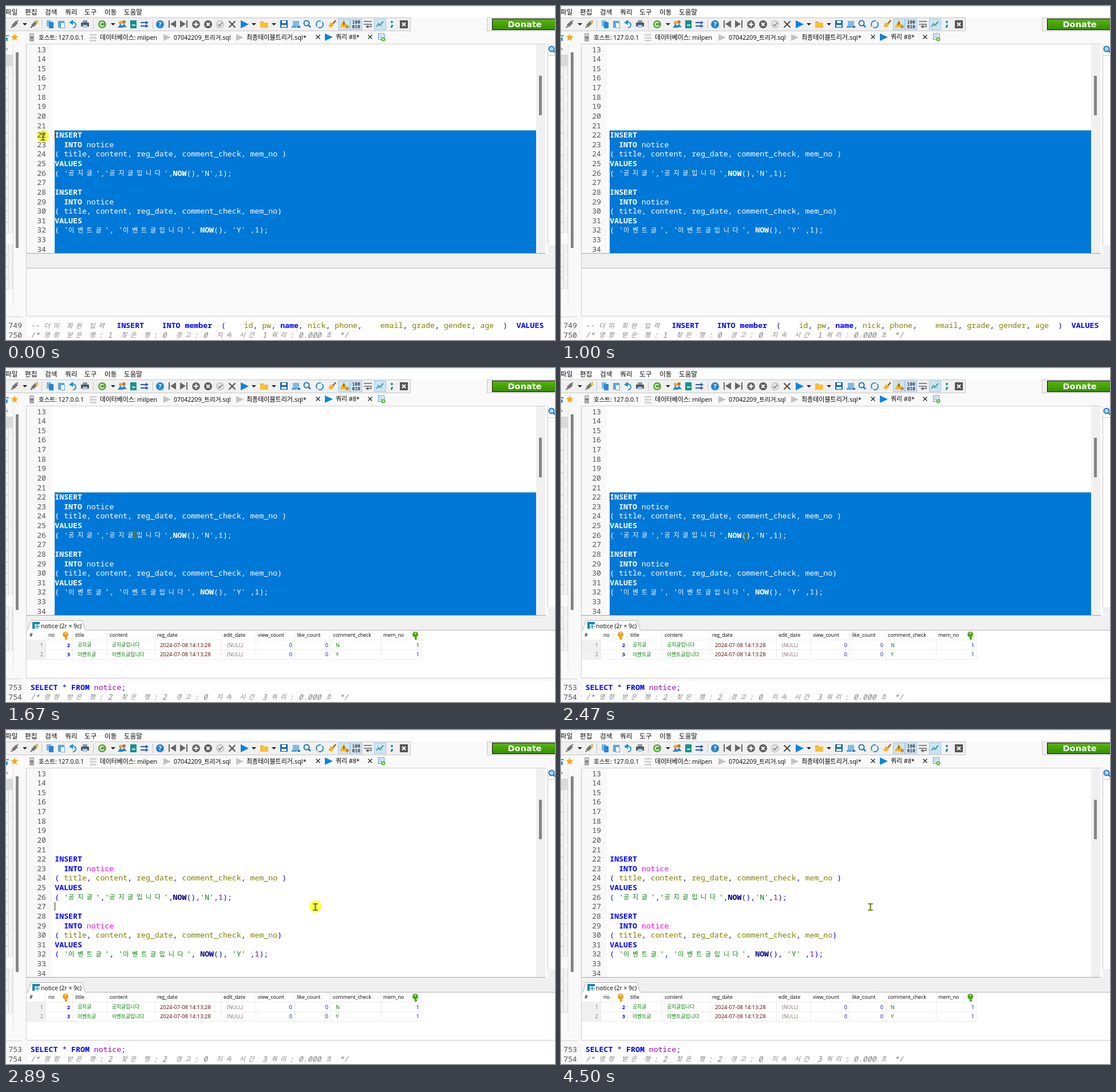
These frames come from a looping animation (959x584 px, 4760 ms). An HTML page with a canvas:

```html
<!DOCTYPE html>
<html lang="ko">
<head>
<meta charset="utf-8">
<style>
html, body { margin: 0; width: 100%; height: 100%; overflow: hidden; background: #f9f9f9; }
canvas { display: block; }
</style>
</head>
<body>
<canvas id="stage" width="959" height="584"></canvas>
<script>
const c = document.getElementById('stage').getContext('2d');
const UI = '"Open Sans", "Noto Sans CJK KR", "Noto Sans CJK", sans-serif';
const MONO = '"Noto Sans Mono", "DejaVu Sans Mono", monospace';
const HANGUL = '"Noto Sans CJK KR", "Noto Sans CJK", sans-serif';
const CELL = 7.935, LINE = 16.62, LOOP = 4760;

const sql = {
  22: 'INSERT',
  23: '  INTO notice',
  24: '( title, content, reg_date, comment_check, mem_no )',
  25: 'VALUES',
  26: "( '공지글','공지글입니다',NOW(),'N',1);",
  28: 'INSERT',
  29: '  INTO notice',
  30: '( title, content, reg_date, comment_check, mem_no)',
  31: 'VALUES',
  32: "( '이벤트글', '이벤트글입니다', NOW(), 'Y' ,1);"
};
const logs = [
  [749, '-- 더미 회원 입력  INSERT    INTO member  (    id, pw, name, nick, phone,    email, grade, gender, age  )  VALUES',
   '/* 영향 받은 행: 1  찾은 행: 0  경고: 0  지속 시간 1 쿼리: 0.000 초 */'],
  [753, 'SELECT * FROM notice;',
   '/* 영향 받은 행: 2  찾은 행: 2  경고: 0  지속 시간 3 쿼리: 0.000 초 */']
];

function box(x, y, w, h, fill) { c.fillStyle = fill; c.fillRect(x, y, w, h); }
function frame(x, y, w, h, color) { c.strokeStyle = color; c.lineWidth = 1; c.strokeRect(x + .5, y + .5, w - 1, h - 1); }
function disc(x, y, r, fill) { c.fillStyle = fill; c.beginPath(); c.arc(x, y, r, 0, 7); c.fill(); }
function poly(pts, fill) {
  c.fillStyle = fill;
  c.beginPath();
  for (let i = 0; i < pts.length; i += 2) c.lineTo(pts[i], pts[i + 1]);
  c.fill();
}
function path(pts, color, w = 1.5) {
  c.strokeStyle = color; c.lineWidth = w;
  c.beginPath();
  for (let i = 0; i < pts.length; i += 2) c.lineTo(pts[i], pts[i + 1]);
  c.stroke();
}
function arc(x, y, r, a, b, color, w = 2) {
  c.strokeStyle = color; c.lineWidth = w;
  c.beginPath(); c.arc(x, y, r, a, b); c.stroke();
}
function cross(x, y, r, color, w) {
  path([x - r, y - r, x + r, y + r], color, w);
  path([x - r, y + r, x + r, y - r], color, w);
}
// y is the middle of the line
function text(s, x, y, size, color = '#000', align = 'left', weight = 500) {
  c.font = `${weight} ${size}px ${UI}`;
  c.textAlign = align; c.fillStyle = color;
  c.fillText(s, x, y + size * .37);
  c.textAlign = 'left';
}

function style(tok, inLog) {
  if (/^(--|\/\*)/.test(tok)) return ['#808080', 'italic'];
  if (tok[0] === "'") return ['#008000', '500'];
  if (tok === 'NOW') return ['#000080', 'bold'];
  if (/^([A-Z]+|member|name)$/.test(tok)) return ['#0000ff', 'bold'];
  if (tok === 'notice') return [inLog ? '#a000c8' : '#ff00ff', '500'];
  if (/^\d/.test(tok)) return ['#800080', '500'];
  return [/^\w/.test(tok) ? '#808000' : '#0000ff', '500'];
}
function code(line, x, y, { selected, inLog } = {}) {
  for (const tok of line.match(/-- .*력|\/\*.*|'[^']*'|\w+|./g)) {
    const [color, face] = style(tok, inLog);
    c.fillStyle = selected ? '#fff' : color;
    for (const ch of tok) {
      const wide = ch > '\u1100';
      c.font = wide ? `${face} 11px ${HANGUL}` : `${face} 13.23px ${MONO}`;
      c.fillText(ch, x, y + (wide ? 4 : 4.6));
      x += wide ? CELL * 2 : CELL;
    }
  }
}
function lineNo(n, right, y) {
  c.font = `13.23px ${MONO}`;
  c.textAlign = 'right'; c.fillStyle = '#555';
  c.fillText(n, right, y + 4.6);
  c.textAlign = 'left';
}

function plug(x) {
  path([x - 6, 38, x - 2, 34], '#666', 2);
  poly([x - 5, 33, x + 2, 26, x + 6, 30, x - 1, 37], '#777');
  path([x + 3, 28, x + 6, 25], '#777', 2);
}
function lens(x, y, color) { arc(x - 1, y - 1, 4.5, 0, 7, color, 2); path([x + 2, y + 2, x + 6, y + 6], color, 2.5); }
function floppy(x, color) { box(x - 6, 25, 13, 13, color); box(x - 3, 26, 7, 4, '#fff'); box(x - 4, 33, 9, 4, '#dbe9f5'); }

function toolbar() {
  box(0, 21, 707, 23, '#f0f0f0');
  path([0, 20.5, 706.5, 20.5, 706.5, 43.5, 0, 43.5], '#c8c8c8', 1);
  for (const x of [62, 152, 256]) box(x, 24, 1, 16, '#c4c4c4');
  for (const x of [580, 601, 643]) { box(x, 22, 21, 20, '#cce4f7'); frame(x, 22, 21, 20, '#9ccbee'); }
  for (const x of [33, 187, 433, 468]) poly([x - 4, 30, x + 4, 30, x, 34], '#222');

  plug(15); plug(49); disc(54, 28, 2.5, '#f2c230');
  box(71, 25, 8, 11, '#77b7e8'); box(75, 28, 8, 11, '#2487d2');
  box(91, 26, 11, 12, '#5aa7df'); box(95, 29, 8, 10, '#fff'); frame(95, 29, 8, 10, '#5aa7df');
  arc(117, 33, 5, -1.8, 1.6, '#1594d2'); poly([110, 29, 117, 24, 117, 33], '#1594d2');
  box(131, 29, 14, 7, '#4c5963'); box(134, 25, 8, 4, '#8796a3'); box(134, 33, 8, 5, '#a9d0ed');
  disc(168, 32, 7, '#57a83b'); arc(168, 32, 3.5, .5, 5.5, '#fff', 1.6);
  disc(200, 29, 3, '#e9a33b'); poly([195, 38, 200, 31, 205, 38], '#2487d2');
  disc(206, 28, 3, '#b97a35'); poly([201, 37, 206, 31, 211, 37], '#357fb6');
  box(217, 25, 11, 14, '#16908b'); box(220, 32, 6, 3, '#9adbd5');
  path([235, 29, 245, 29], '#2458c8', 2); poly([244, 26, 249, 29, 244, 32], '#2458c8');
  path([235, 35, 245, 35], '#2458c8', 2); poly([244, 32, 249, 35, 244, 38], '#2458c8');
  disc(269, 32, 7, '#1c84d6'); text('?', 269, 32, 11, '#fff', 'center', 'bold');
  box(284, 25, 2, 13, '#666'); poly([297, 25, 297, 38, 287, 31.5], '#666');
  box(315, 25, 2, 13, '#666'); poly([304, 25, 304, 38, 314, 31.5], '#666');
  disc(332, 32, 7, '#6b6b6b'); path([328, 32, 336, 32], '#fff', 2); path([332, 28, 332, 36], '#fff', 2);
  disc(353, 32, 7, '#5d5d5d'); cross(353, 32, 2.8, '#fff', 2);
  disc(374, 32, 7, '#bcbcbc'); disc(374, 32, 5.8, '#e4e4e4'); path([371, 32, 373, 35, 378, 29], '#777');
  cross(395, 32, 5.5, '#555', 2.3);
  poly([410, 25, 424, 32, 410, 39], '#0a84e0');
  box(444, 27, 6, 4, '#f0b323'); box(444, 29, 14, 9, '#f8c032');
  floppy(485, '#1769ab');
  box(501, 26, 11, 9, '#7fbbe6'); box(499, 35, 9, 3, '#4aa3df'); box(509, 35, 5, 3, '#2b6ca3');
  lens(526, 31, '#1f78c0');
  arc(548, 32, 6, -.8, 2, '#2b8dd8'); arc(548, 32, 6, 2.4, 5.1, '#2b8dd8');
  path([571, 31, 576, 25], '#9b6024', 2.5); poly([568, 28, 573, 33, 568, 38, 563, 35], '#f0b429');
  poly([590, 24, 597, 37, 583, 37], '#f4b41c'); box(589.5, 28, 1.5, 5, '#333'); disc(596, 36, 3, '#e08a20');
  c.font = `bold 8px ${MONO}`; c.fillStyle = '#444';
  c.fillText('100', 604.5, 31); c.fillText('010', 604.5, 39);
  path([625, 27, 639, 27], '#666'); path([625, 32, 638, 32, 638, 36, 631, 36], '#666'); poly([633, 33, 633, 39, 628, 36], '#666');
  path([647, 36, 651, 31, 653, 34, 659, 27], '#3f9b90', 2); path([649, 29, 658, 36], '#78b8b0', 1);
  disc(674, 28, 2, '#168a9b'); path([675, 33, 673, 38], '#168a9b', 3);
  box(688, 25, 14, 14, '#555'); cross(695, 32, 3, '#fff', 2);

  box(840, 21, 119, 23, '#f0f0f0'); frame(840, 20, 125, 24, '#c8c8c8');
  box(849, 22, 110, 20, '#111');
  const green = c.createLinearGradient(0, 23, 0, 41);
  green.addColorStop(0, '#55b50c'); green.addColorStop(1, '#379000');
  box(850, 23, 109, 18, green);
  c.font = 'bold 14.6px "DejaVu Sans", sans-serif';
  c.fillStyle = '#fff'; c.fillText('Donate', 876.5, 37);
}

function tabs() {
  box(0, 51, 5, 2, '#2b9be0'); box(0, 55, 3, 6, '#2b9be0');
  const star = [];
  for (let i = 0; i < 10; i++) {
    const r = i % 2 ? 3 : 7, a = i * Math.PI / 5;
    star.push(15 + r * Math.sin(a), 55 - r * Math.cos(a));
  }
  poly(star, '#f7a81b');
  box(41, 48, 8, 14, '#a9a9a9'); box(42, 50, 6, 2, '#e8e8e8'); box(42, 54, 6, 2, '#777');
  for (const y of [49, 54, 59]) box(146, y, 12, 3, '#d2d2d2');
  for (const x of [275, 402]) poly([x, 49, x + 13, 55, x, 61], '#c3c3be');
  poly([557, 48, 571, 54.5, 557, 61], '#0a84e0');
  text('호스트: 127.0.0.1', 57, 55, 10.5);
  text('데이터베이스: milpen', 164, 55, 10.8);
  text('07042209_트리거.sql', 293, 55, 10.6);
  text('최종테이블트리거.sql*', 420, 55, 11);
  text('쿼리 #8*', 576, 54, 10.8);
  cross(545, 54, 3.5, '#222', 1.3); cross(636, 54, 3.5, '#222', 1.3);
  box(650, 48, 11, 11, '#fff'); frame(650, 48, 11, 11, '#3f96d6');
  path([652, 52, 658, 52], '#3f96d6', 1); path([652, 55, 657, 55], '#3f96d6', 1);
  disc(659, 58, 3.5, '#4fae36'); path([657, 58, 661, 58], '#fff', 1); path([659, 56, 659, 60], '#fff', 1);
}

function sidePanels() {
  path([0, 73, 3, 77], '#333', 1);
  box(0, 85, 12, 20, '#dadada');
  for (let i = 1; i < 21; i++) {
    if (i === 16) continue;
    const y = Math.round(85.5 + i * 19.5);
    box(0, y, 12, 19, '#f3f3f3');
    path([0, y + .5, 4.5, y + .5, 4.5, y + 18.5, 0, y + 18.5], '#d6d6d6', 1);
    box(11, y, 1, 19, '#d6d6d6');
  }
  box(12, 67, 1, 460, '#e4e4e4');
  box(17, 81, 5, 342, '#858585');
  box(0, 543, 28, 1, '#d0d0d0');
  box(946, 67, 13, 351, '#fff'); box(946, 67, 1, 351, '#c8c8c8');
  box(947, 86, 12, 1, '#c8c8c8'); box(947, 418, 12, 14, '#f0f0f0');
  disc(953, 75, 5, '#a9d6f2'); lens(954, 76, '#1f78c0');
}

function editor(t) {
  const selected = t < 2890;
  box(35, 66, 908, 367, '#fff');
  box(36, 67, 44, 365, '#f8f8f8');
  box(926, 67, 16, 365, '#f0f0f0');
  box(35, 66, 908, 1, '#d0d0d0'); box(35, 66, 1, 367, '#c8c8c8');
  if (selected) box(85, 217.5, 841, 214.5, '#0078d7');
  for (let n = 13; n <= 34; n++) {
    const y = 76 + (n - 13) * LINE;
    lineNo(n, 70, y);
    if (sql[n]) code(sql[n], 85.3, y, { selected });
  }
  box(35, 432, 908, 1, '#a6a6a6');
  box(931, 122, 5, 69, '#858585');
  const on = t < 470 || t >= 1000 && t < 1530 || t >= 2200 && t < 2890;
  if (on) box(85, 218, 1, 15, '#20201c');
  if (t >= 2890 && t < 3420 || t >= 3970 && t < 4500) box(85, 301, 1, 15, '#003c00');
}

function key(x, color) {
  disc(x, 466, 5, color); disc(x, 464, 1.5, '#fff');
  box(x - 1, 469, 3, 6, color); box(x + 1, 472, 2, 2, color);
}
function grid() {
  poly([38, 459, 44, 441, 133, 441, 139, 459], '#fff');
  path([35, 458.5, 38, 458.5, 43.5, 441.5, 133, 441.5, 138.5, 458.5, 959, 458.5], '#b4b4b4', 1);
  box(46, 444, 13, 12, '#1888a8'); box(50, 448, 9, 8, '#d6eef4');
  path([50, 452, 59, 452], '#1888a8', 1); path([54.5, 448, 54.5, 456], '#1888a8', 1);
  text('notice (2r × 9c)', 61, 451, 10.4);
  box(36, 459, 923, 82, '#fff');
  box(36, 476, 33, 33, '#f0f0f0');
  for (const x of [69, 116, 176, 260, 376, 436, 504, 567, 655, 725]) box(x, 460, 1, 49, '#ececec');
  for (const y of [475, 492, 509]) box(36, y, 690, 1, '#ececec');
  const heads = { '#': 41, no: 74, title: 121, content: 181, reg_date: 264, edit_date: 380,
    view_count: 440, like_count: 508, comment_check: 571, mem_no: 659 };
  for (const h in heads) text(h, heads[h], 467, 8.85);
  key(104, '#f59a16'); key(715, '#48a80e');
  [['공지글', 'N'], ['이벤트글', 'Y']].forEach(([title, check], i) => {
    const y = 484.5 + i * 16.5;
    const num = (s, x, color, weight) => text(s, x, y, 9, color, 'right', weight);
    num(i + 1, 65, '#777');
    num(i + 2, 112, '#0000ff', 'bold');
    text(title, 125, y - .5, 8.8, '#008000');
    text(title + '입니다', 185, y - .5, 8.8, '#008000');
    text('2024-07-08 14:13:28', 269, y, 9.4, '#600000');
    text('(NULL)', 386, y, 9, '#886c6c');
    num(0, 500, '#0000ff'); num(0, 563, '#0000ff'); num(1, 722, '#0000ff');
    text(check, 576, y, 9, '#008000');
  });
}

function results(t) {
  box(35, 433, 924, 25, '#f0f0f0');
  if (t >= 1600) grid();
  else box(35, 458, 924, 1, '#b4b4b4');
  box(35, 433, 1, 109, '#d0d0d0');
  box(35, 542, 924, 1, '#d0d0d0');
  box(0, 547, 959, 37, '#fff'); box(0, 547, 38, 37, '#f8f8f8');
  const [n, first, second] = logs[t < 1530 ? 0 : 1];
  [first, second].forEach((line, i) => {
    lineNo(n + i, 28, 558.7 + i * LINE);
    code(line, 42.7, 558.7 + i * LINE, { inLog: true });
  });
}

function pointer(t) {
  const steps = (start, dt, count) => Math.min(count, Math.max(0, Math.floor((t - start) / dt) + 1)) / count;
  const a = steps(270, 67, 4);
  const b = 1 - (1 - steps(2470, 70, 7)) ** 2.4;
  const x = 64.5 + 160 * a + 316 * b, y = 229 + 62 * a + 18.5 * b;
  const glow = t < 270 || t >= 2890 && t < 3020 ? 1 : t < 340 || t >= 3020 && t < 3090 ? .5 : 0;
  if (glow) {
    c.globalAlpha = glow;
    c.globalCompositeOperation = 'multiply';
    disc(x, y - 1, 10.8, '#ffff58');
    c.globalCompositeOperation = 'source-over';
    c.globalAlpha = 1;
  }
  for (const [color, w] of [['#4d6a12', 2.2], ['#8c9a18', .8]]) {
    path([x, y - 5.5, x, y + 6], color, w);
    for (const dy of [-5.5, 5.5]) path([x - 4, y + dy, x + 4, y + dy], color, w * .8);
  }
}

function draw(now) {
  const t = now % LOOP;
  box(0, 0, 959, 584, '#f9f9f9');
  box(0, 0, 959, 20, '#fff');
  box(0, 0, 959, 1, '#dfe5ec');
  const menu = { 파일: -1, 편집: 33, 검색: 68, 쿼리: 103, 도구: 137, 이동: 172, 도움말: 206 };
  for (const m in menu) text(m, menu[m], 10.5, 11.6);
  toolbar();
  tabs();
  sidePanels();
  editor(t);
  results(t);
  pointer(t);
}

const start = performance.now();
(function loop() {
  draw(performance.now() - start);
  requestAnimationFrame(loop);
})();
</script>
</body>
</html>
```
